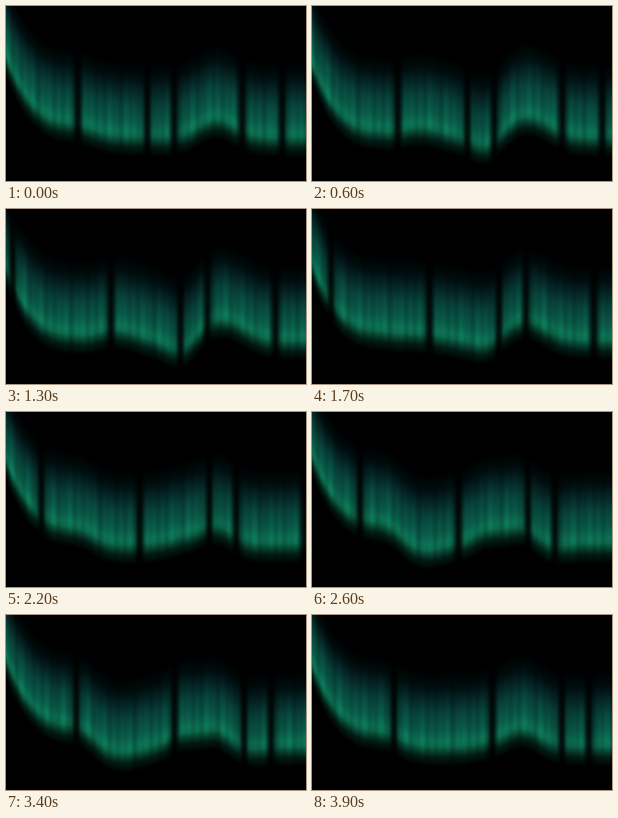
Write an HTML page with a canvas that moves like this. It is 300x175 px and loops after 4 s.

```html
<!DOCTYPE html>
<html lang="en">
<head>
<meta charset="utf-8">
<title>Aurora</title>
<style>
html, body { margin: 0; width: 100%; height: 100%; overflow: hidden; background: #000; }
canvas { display: block; width: 100%; height: 100%; }
</style>
</head>
<body>
<canvas id="sky" width="300" height="175"></canvas>
<script>
const W = 300, H = 175, LOOP = 4000, STEP = 100, HEM = 80, RAY = 98;
const ctx = document.getElementById('sky').getContext('2d');

const bell = (x, mid, width) => Math.exp(-(((x - mid) / width) ** 2) / 2);
const wave = t => Math.sin(Math.PI * t / 2);

// Lower hem: a falling slope with an arch, around which it sways.
const rest = x => 136 - 80 * Math.exp(-x / 29) - 6 * bell(x, 72, 16) - 18 * bell(x, 210, 18);
const sway = x => 4.5 * (1 - Math.tanh((x - 88) / 10))
  - 10 * bell(x, 112, 18) + 13 * bell(x, 174, 13) - 8 * bell(x, 233, 16);

// Dark folds and faint streaks drift to the right together.
const folds = [-27, 71, 141, 168, 236, 276];
const drift = t => 27.7 * t - 3.2 * wave(t);

function light(u) {
  const streaks = 0.88 + 0.05 * Math.sin(u * 0.75)
    + 0.05 * Math.sin(u * 0.31 + 1) + 0.04 * Math.sin(u * 0.47 + 2);
  return folds.reduce((a, x) => a * (1 - 0.85 * bell(u, x, 3.2)), streaks);
}

// One vertical ray of light, reused for every column.
function makeRay() {
  const ray = document.createElement('canvas');
  ray.width = 1;
  ray.height = RAY;
  const rc = ray.getContext('2d');
  const glow = rc.createLinearGradient(0, 0, 0, RAY);
  const stop = (y, rgb) => glow.addColorStop(y / RAY, `rgb(${rgb})`);
  stop(0, '0,0,0');
  stop(16, '2,16,17');
  stop(28, '6,41,41');
  stop(44, '9,77,67');
  stop(60, '11,101,80');
  stop(70, '14,125,93');
  stop(75, '13,118,86');
  stop(80, '9,78,56');
  stop(86, '4,33,24');
  stop(96, '0,0,0');
  rc.fillStyle = glow;
  rc.fillRect(0, 0, 1, RAY);
  return ray;
}
const ray = makeRay();

function draw(t) {
  const shift = drift(t), swing = wave(t);
  ctx.globalAlpha = 1;
  ctx.fillStyle = '#000';
  ctx.fillRect(0, 0, W, H);
  for (let x = 0; x < W; x++) {
    ctx.globalAlpha = light(x - shift);
    ctx.drawImage(ray, x, rest(x) + swing * sway(x) - HEM, 1, RAY);
  }
}

const start = performance.now();
let last = -1;
function tick() {
  const step = Math.floor((performance.now() - start) % LOOP / STEP);
  if (step !== last) {
    last = step;
    draw(step * STEP / 1000);
  }
  requestAnimationFrame(tick);
}
tick();
</script>
</body>
</html>
```
